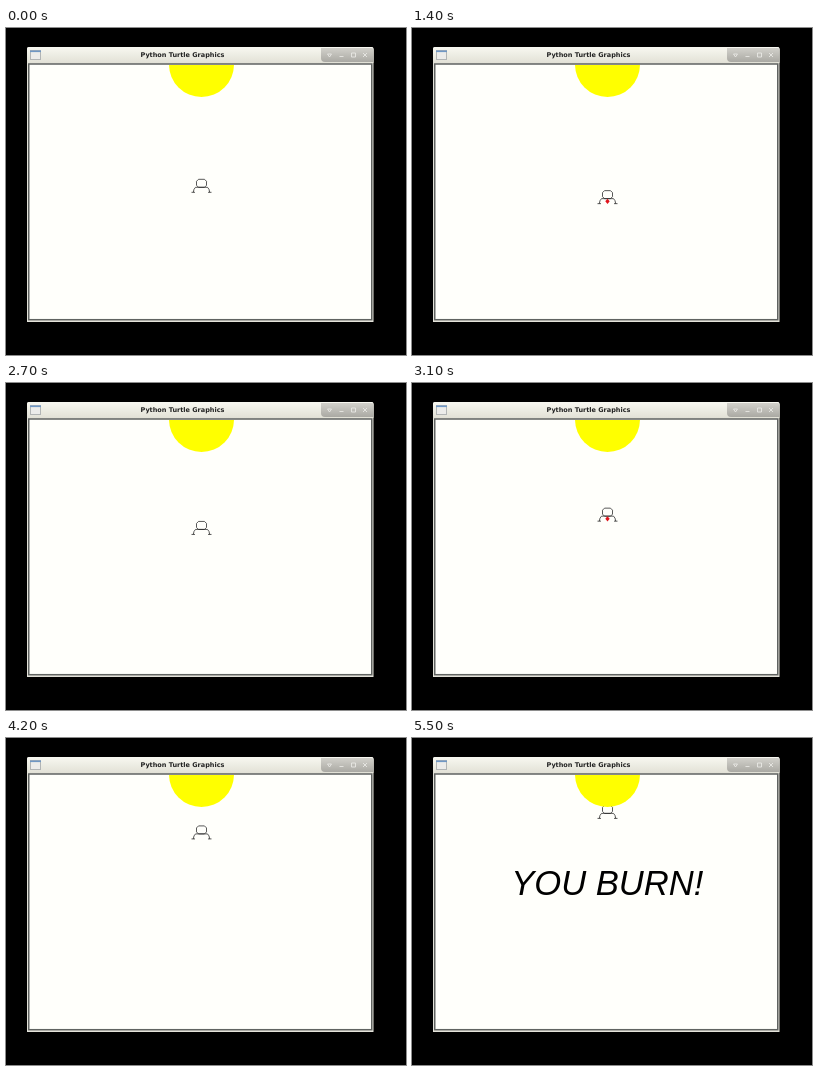
Recreate the animation shown at these times as an HTML page. Size 400x327 px, loop 7.7 s.

```html
<!DOCTYPE html>
<html lang="en">
<head>
<meta charset="utf-8">
<title>Lander</title>
<style>
html, body { margin: 0; width: 100%; height: 100%; overflow: hidden; background: #000 }
svg { display: block; width: 400px; height: 327px }
</style>
</head>
<body>
<svg viewBox="0 0 400 327">
  <defs>
    <linearGradient id="bar" x2="0" y2="1"><stop stop-color="#f8f8f1"/><stop offset="1" stop-color="#e2e1d6"/></linearGradient>
    <linearGradient id="grip" x2="0" y2="1"><stop stop-color="#d2d1cb"/><stop offset="1" stop-color="#aaa9a3"/></linearGradient>
    <clipPath id="view"><rect x="24" y="37" width="341" height="254"/></clipPath>
  </defs>
  <path d="M21 294V21q0-2 2-2H365.500q2 0 2 2V294z" fill="#e4e3da"/>
  <path d="M21 35V21q0-2 2-2H365.500q2 0 2 2V35z" fill="url(#bar)"/>
  <path d="M315 20H365.500q2 0 2 2V34H319q-4 0-4-4z" fill="url(#grip)"/>
  <path d="M321.500 26h4l-2 3zM333.500 28.500h4M345.500 25h4v4h-4zM357 25l4 4m0-4l-4 4" fill="none" stroke="#eeeeea" stroke-width=".8"/>
  <rect x="24.500" y="22.500" width="10" height="9" fill="#ececea" stroke="#b2b5b5"/>
  <path d="M24 23.300h11" stroke="#6f97c4" stroke-width="1.600"/>
  <text x="134.500" y="29.200" font-family="DejaVu Sans, sans-serif" font-weight="bold" font-size="6.500" fill="#222">Python Turtle Graphics</text>
  <rect x="22.750" y="36" width="343" height="255.700" fill="#fffffb" stroke="#606361" stroke-width="1.500"/>
  <g clip-path="url(#view)">
    <g id="lander" fill="none" stroke="#222" stroke-width=".75">
      <path d="M192.500-13h6l2 2v4l-2 2h-6l-2-2v-4zM185.500 0h3.500M187.300 0l.7-3 1.500-2h12l1.500 2 .7 3M202 0h3.500"/>
      <path id="flame" d="M195.500-5l2.200 2.700-2.200 2.700-2.200-2.700z" fill="#e0141c" stroke="none"/>
    </g>
    <circle cx="195.500" cy="36.500" r="32.500" fill="#ff0"/>
    <text id="end" x="195.300" y="156.800" text-anchor="middle" font-family="Liberation Sans, Arial, sans-serif" font-style="italic" font-size="34.600">YOU BURN!</text>
  </g>
</svg>
<script>
const LOOP = 7700, STEP = 100, LAST = 55;
const START = 164.3, SPEED = .1, GRAVITY = .25, THRUST = .97; // px and steps
const burns = [9, 10, 11, 12, 13, 14, 20, 23, 24, 25, 26, 31, 33, 40, 52]; // steps with the engine on
const $ = id => document.getElementById(id);
const show = (id, on) => $(id).style.display = on ? "" : "none";

// free fall, less the lift of every burn so far
function feet(n) {
  const lift = burns.reduce((sum, b) => sum + Math.max(0, n - b), 0);
  return START + SPEED * n + GRAVITY * n * n / 2 - THRUST * lift;
}

function draw(ms) {
  const n = Math.min(LAST, Math.floor(ms % LOOP / STEP));
  $("lander").setAttribute("transform", `translate(0 ${feet(n)})`);
  show("flame", burns.includes(n));
  show("end", n === LAST);
}

const start = performance.now();
function tick() {
  draw(performance.now() - start);
  requestAnimationFrame(tick);
}
tick();
</script>
</body>
</html>
```
